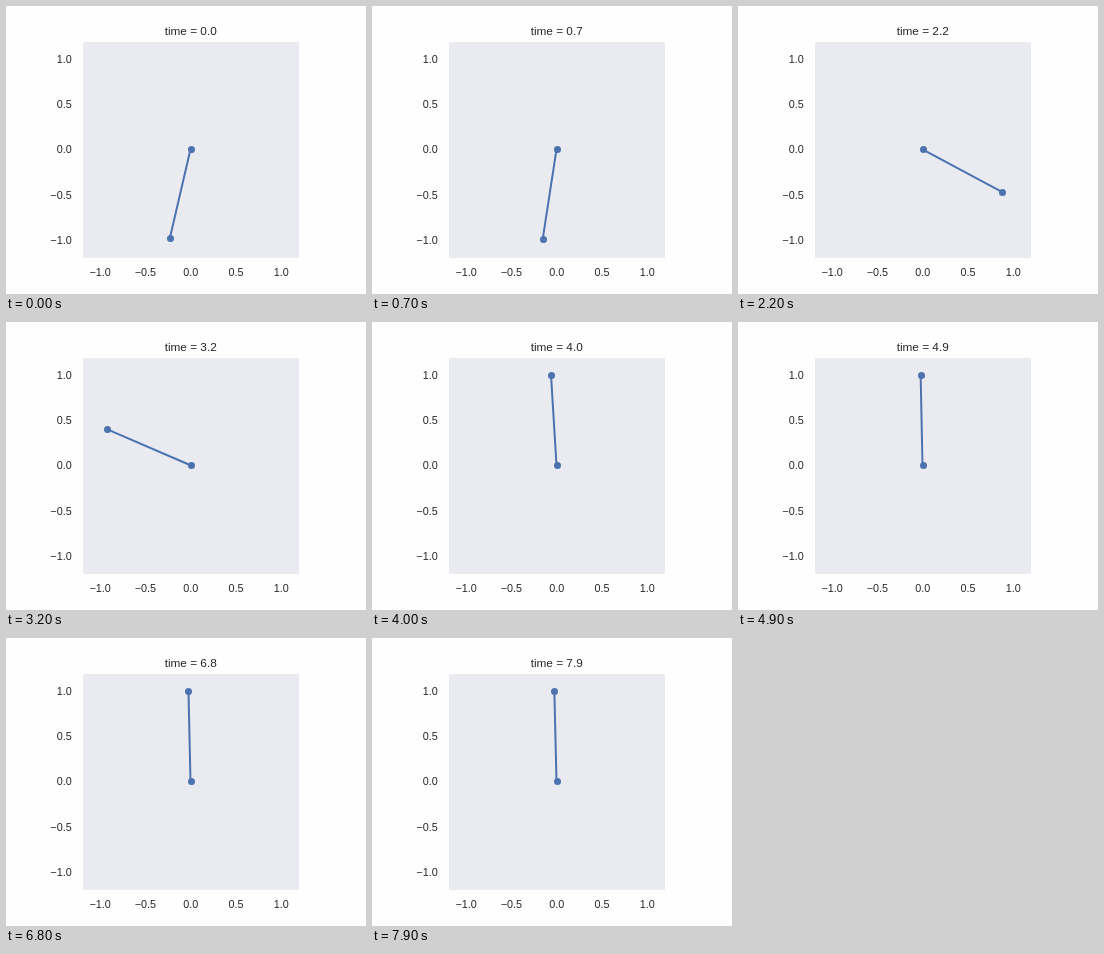
An HTML page that plays this animation: 360x288 px, repeating every 8 s.

```html
<!DOCTYPE html>
<html lang="en">
<head>
<meta charset="utf-8">
<title>Pendulum swing-up</title>
<style>
  html, body { margin: 0; width: 360px; height: 288px; overflow: hidden; background: #fefefe; }
  svg { display: block; }
  text { font: 10.8px "Liberation Sans", Arial, sans-serif; fill: #262626; }
  #title { font-size: 11.8px; }
</style>
</head>
<body>
<svg id="plot" width="360" height="288" viewBox="0 0 360 288">
  <rect x="77" y="36" width="216" height="216" fill="#e9ebf0"/>
  <text id="title" x="184.7" y="29" text-anchor="middle">time = 0.0</text>
  <g fill="#4c72b0">
    <line id="rod" stroke="#4c72b0" stroke-width="2" stroke-linecap="round"/>
    <circle id="pivot" r="3.5"/>
    <circle id="bob" r="3.5"/>
  </g>
</svg>
<script>
const LOOP = 8000, STEP = 100;
const CX = 184.5, CY = 143.28, UNIT = 90.6;
const $ = id => document.getElementById(id);

// Swing-up: time (s), angle from straight down (right is positive), angular speed
const keys = [
  { t: 0, a: -0.228, v: 1.7 },
  { t: 0.35, a: 0.135, v: 0 },
  { t: 0.9, a: -0.415, v: -1.2 },
  { t: 1.4, a: -0.685, v: 0 },
  { t: 1.8, a: 0, v: 3 },
  { t: 2.3, a: 1.172, v: 0.3 },
  { t: 2.7, a: 0.15, v: -4.6 },
  { t: 3.2, a: -1.978, v: -3.1 },
  { t: 3.6, a: -2.822, v: -1.5 }
];

function set(el, attrs) {
  for (const k in attrs) el.setAttribute(k, attrs[k]);
}

function label(text, x, y, anchor) {
  const el = document.createElementNS($("plot").namespaceURI, "text");
  set(el, { x, y, "text-anchor": anchor });
  el.textContent = text;
  $("plot").append(el);
}

for (let v = -1; v <= 1; v += 0.5) {
  const text = v.toFixed(1).replace("-", "\u2212");
  label(text, CX + 0.2 + v * UNIT, 270, "middle");
  label(text, 65.7, Math.round(CY - v * UNIT + 4), "end");
}

// Cubic Hermite curve between two keys
function hermite(p, q, t) {
  const d = q.t - p.t, s = (t - p.t) / d, r = 1 - s;
  return r * r * ((1 + 2 * s) * p.a + s * d * p.v)
       + s * s * ((1 + 2 * r) * q.a - r * d * q.v);
}

function angle(t) {
  const n = keys.findIndex(k => k.t > t);
  if (n > 0) return hermite(keys[n - 1], keys[n], t);
  // Settles just left of upright with a slight tremble
  return -Math.PI + 0.021 + 0.299 * Math.exp(-5 * (t - 3.6)) - 0.003 * Math.sin(7 * t);
}

// Dots sit on whole pixels
function placeDot(el, x, y) {
  set(el, { cx: Math.round(x) + 0.5, cy: Math.round(y) + 0.5 });
}

function draw(t) {
  const a = angle(t);
  const x = CX + UNIT * Math.sin(a), y = CY + UNIT * Math.cos(a);
  set($("rod"), { x1: CX, y1: CY, x2: x, y2: y });
  placeDot($("bob"), x, y);
  $("title").textContent = "time = " + t.toFixed(1);
}

placeDot($("pivot"), CX, CY);
draw(0);

const start = performance.now();
function tick() {
  const ms = Math.max(0, performance.now() - start) % LOOP;
  draw(Math.floor(ms / STEP) / 10);
  requestAnimationFrame(tick);
}
requestAnimationFrame(tick);
</script>
</body>
</html>
```
